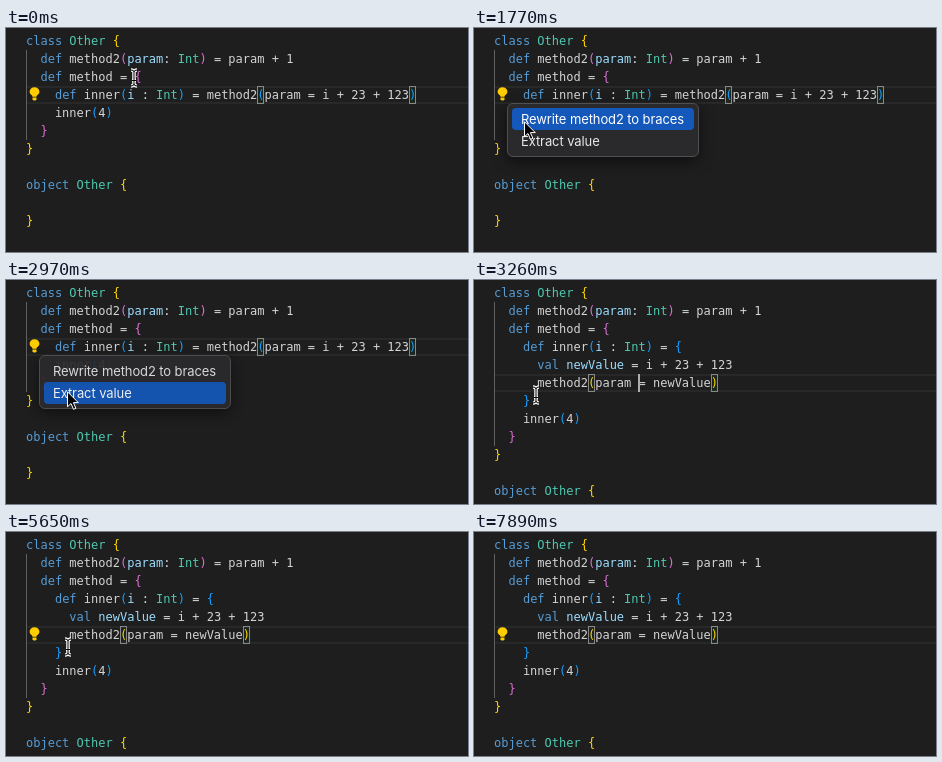
These frames come from a looping animation (462 by 224 pixels, 8180 ms). An HTML page:

```html
<!DOCTYPE html>
<html lang="en">
<head>
<meta charset="utf-8">
<title>Extract value</title>
<style>
  html, body { margin: 0; width: 100%; height: 100%; overflow: hidden; background: #1e1e1e; }
  #stage { position: absolute; left: 0; top: 0; width: 462px; height: 224px; overflow: hidden; }
  #stage > * { position: absolute; }
  pre { left: 20px; top: 4px; margin: 0; color: #d4d4d4; font: 12px/18px "DejaVu Sans Mono", monospace; }
  .keyword { color: #569cd6; }
  .type { color: #4ec9b0; }
  .variable { color: #9cdcfe; }
  .depth0 { color: #ffd700; }
  .depth1 { color: #da70d6; }
  .depth2 { color: #179fff; }
  #line { left: 20px; right: 0; height: 18px; box-sizing: border-box; border: solid #282828; border-width: 2px 0; }
  #guide { left: 20px; top: 22px; width: 1px; background: #606060; }
  .match { width: 7px; height: 18px; box-sizing: border-box; border: 1px solid #888; background: #0064001a; }
  #caret { width: 2px; height: 18px; background: #aeafad; }
  #menu { left: 33px; top: 75px; width: 192px; height: 54px; box-sizing: border-box; padding: 4px;
    border: 1px solid #505053; border-radius: 6px; background: #2a292c; box-shadow: 0 4px 14px #0008; }
  #menu div { height: 22px; padding-left: 9px; border-radius: 4px; color: #e8e8e8; white-space: nowrap;
    font: 13px/22px Inter, sans-serif; letter-spacing: -.1px; }
  #menu .selected { background: #1458bb; color: #fff; }
  svg { left: 0; top: 0; overflow: visible; }
</style>
</head>
<body>
<div id="stage">
  <div id="line"></div>
  <div id="guide"></div>
  <div class="match"></div>
  <div class="match"></div>
  <pre id="code"></pre>
  <div id="caret"></div>
  <svg id="bulb" width="12" height="15">
    <path d="M3.5 9.8C3.5 8 .6 7.6 .6 4.8a4.9 4.6 0 0 1 9.8 0C10.4 7.6 7.5 8 7.5 9.8Z" fill="#fc0"/>
    <path d="M3.5 10.5h4v2l-1 1h-2l-1-1z" fill="#fc0"/>
  </svg>
  <div id="menu"><div>Rewrite method2 to braces</div><div>Extract value</div></div>
  <svg id="arrow" width="14" height="20">
    <path d="M.5 .8v15l3.5-3.3 2.5 5.8 2.4-1-2.5-5.7h4.9z" fill="#000" stroke="#fff"/>
  </svg>
  <svg id="beam" width="1" height="1" fill="none">
    <path id="beamShape" d="M-3-8Q0-8 0-6Q0-8 3-8M0-6V6M-3 8Q0 8 0 6Q0 8 3 8M-2 2.5H2" stroke="#fff" stroke-width="3"/>
    <use href="#beamShape"/>
    <path d="M-3-8Q0-8 0-6Q0-8 3-8M0-6V6M-3 8Q0 8 0 6Q0 8 3 8M-2 2.5H2" stroke="#000"/>
  </svg>
</div>
<script>
const LOOP = 8180, CHAR = 7.224, ROW = 18;
const EDIT = 3260;

const head = `class Other {
  def method2(param: Int) = param + 1
  def method = {
    def inner(i : Int) = `;
const tail = `
    inner(4)
  }
}

object Other {

}`;
const before = {
  html: highlight(head + "method2(param = i + 23 + 123)" + tail),
  row: 3, caret: 39, brackets: [32, 53], guideRows: 5
};
const after = {
  html: highlight(head + `{
      val newValue = i + 23 + 123
      method2(param = newValue)
    }` + tail),
  row: 5, caret: 20, brackets: [13, 30], guideRows: 8
};

// [time, x, y, pointer]
const pointerSteps = [
  [0, 128, 50, "beam"], [140, 104, 53, "beam"], [290, 46, 60, "arrow"], [430, 30, 61, "arrow"],
  [1470, 32, 65, "arrow"], [1620, 40, 78, "arrow"], [1770, 50, 93, "arrow"],
  [1920, 58, 105, "arrow"], [2070, 61, 111, "arrow"],
  [EDIT, 62, 115, "beam"], [7150, 74, 121, "beam"], [7300, 150, 148, "beam"],
  [7450, 260, 184, "beam"], [7600, 345, 210, "beam"], [7740, 382, 222, "beam"], [7890, 0, 0, ""]
];
const caretToggles = [290, 730, 1180, 1620, 2220, 2670, EDIT, 3710, 4160, 4760, 5210, 5650, 6250, 6700, 7150, 7600];

const $ = id => document.getElementById(id);
const matches = document.querySelectorAll(".match");
const items = $("menu").children;
let shown;

function highlight(source) {
  let depth = 0;
  const span = (name, text) => `<span class="${name}">${text}</span>`;
  return source.replace(/\b(class|def|object|val)\b|\b(Other|Int)\b|(\w+(?=\s*:)|(?<=val )\w+)|([({])|[)}]/g,
    (text, keyword, type, variable, open) => {
      if (keyword) return span("keyword", text);
      if (type) return span("type", text);
      if (variable) return span("variable", text);
      return span("depth" + (open ? depth++ : --depth) % 3, text);
    });
}

function place(element, x, y) {
  element.style.left = x + "px";
  element.style.top = y + "px";
}

function show(element, visible) {
  element.style.visibility = visible ? "visible" : "hidden";
}

function showCode(state) {
  if (shown === state) return;
  shown = state;
  const top = 4 + state.row * ROW;
  $("code").innerHTML = state.html;
  $("line").style.top = top + "px";
  $("guide").style.height = state.guideRows * ROW + "px";
  matches.forEach((box, i) => place(box, Math.round(20 + state.brackets[i] * CHAR), top));
  place($("caret"), Math.floor(20 + state.caret * CHAR), top);
  place($("bulb"), 23, top + 1);
}

function render(t) {
  showCode(t < EDIT ? before : after);
  show($("caret"), caretToggles.filter(time => time <= t).length % 2);
  show($("bulb"), t < EDIT || t >= 3410);

  const [, x, y, pointer] = pointerSteps.findLast(step => step[0] <= t);
  for (const id of ["arrow", "beam"]) {
    show($(id), id === pointer);
    place($(id), x, y);
  }

  $("menu").style.opacity = t < 730 || t >= 3110 ? 0 : t < 2970 ? 1 : 0.92;
  const extract = t >= 1920;
  const selecting = t >= 880 && !(t >= 2820 && t < 2970);
  items[0].className = selecting && !extract ? "selected" : "";
  items[1].className = selecting && extract ? "selected" : "";
}

function tick(now) {
  render(now % LOOP);
  requestAnimationFrame(tick);
}
render(0);
requestAnimationFrame(tick);
</script>
</body>
</html>
```
